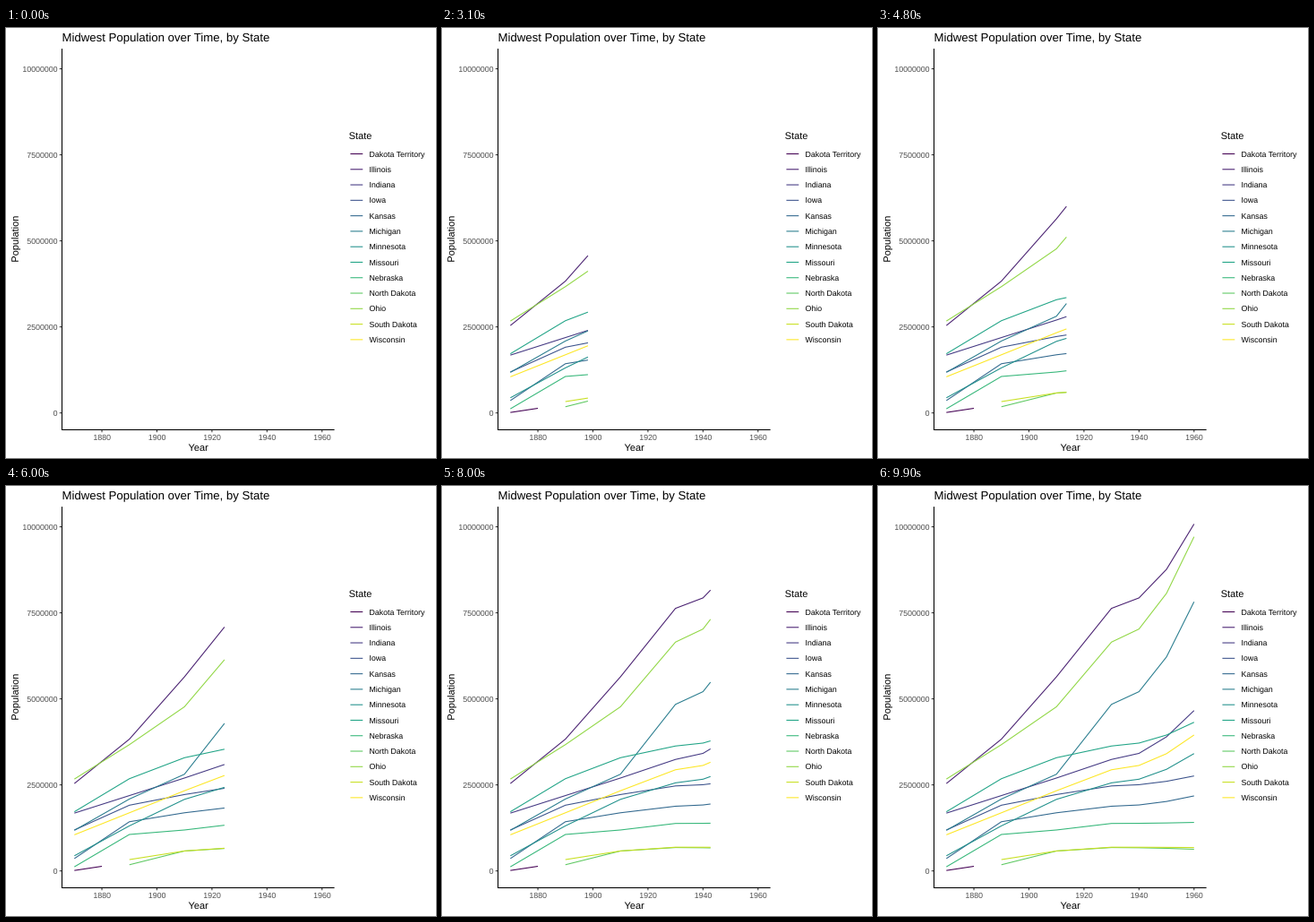
Recreate the animation shown at these times as a matplotlib script. Size 480 by 480 pixels, loop 10 s.

```python
import numpy as np
import matplotlib.pyplot as plt
from matplotlib.animation import FuncAnimation
from matplotlib.patches import PathPatch
from matplotlib.textpath import TextPath
from matplotlib.transforms import Affine2D

SIZE, DPI = 480, 72          # one point equals one pixel
FRAMES, INTERVAL = 100, 100
LINE = 1.07
FIRST, LAST = 1870, 1960

# Millions of people in the key years, from each state's first year on
KEY_YEARS = np.array([1870, 1890, 1910, 1930, 1960])
STATES = {
    "Dakota Territory": (0.014, 0.256),
    "Illinois": (2.54, 3.83, 5.64, 7.63, 10.08),
    "Indiana": (1.68, 2.19, 2.70, 3.24, 4.66),
    "Iowa": (1.19, 1.91, 2.22, 2.47, 2.76),
    "Kansas": (0.36, 1.43, 1.69, 1.88, 2.18),
    "Michigan": (1.18, 2.09, 2.81, 4.84, 7.82),
    "Minnesota": (0.44, 1.31, 2.08, 2.56, 3.41),
    "Missouri": (1.72, 2.68, 3.29, 3.63, 4.32),
    "Nebraska": (0.12, 1.06, 1.19, 1.38, 1.41),
    "North Dakota": (0.18, 0.58, 0.68, 0.63),
    "Ohio": (2.67, 3.67, 4.77, 6.65, 9.71),
    "South Dakota": (0.33, 0.58, 0.69, 0.68),
    "Wisconsin": (1.05, 1.69, 2.33, 2.94, 3.95),
}
SPANS = {"Dakota Territory": (1870, 1880),
         "North Dakota": (1890, LAST), "South Dakota": (1890, LAST)}

# Panel edges in pixels, y pointing down
LEFT, RIGHT, TOP, BOTTOM = 62.5, 366.6, 23.1, 448.5
LOW, HIGH = 0.014, 10.081
LEGEND, KEY = 382.7, 17.28


def scale(value, lo, hi, start, end):
    """Map value to pixels with 5% padding on both sides."""
    pad = 0.05 * (hi - lo)
    return start + (value - lo + pad) / (hi - lo + 2 * pad) * (end - start)


def px(year):
    return scale(year, FIRST, LAST, LEFT, RIGHT)


def py(pop):
    return scale(pop, LOW, HIGH, BOTTOM, TOP)


def census(name):
    """Decades and counts; growth after 1930 starts slowly and speeds up."""
    first, last = SPANS.get(name, (FIRST, LAST))
    years = np.arange(first, last + 1, 10)
    keys = STATES[name]
    knots = KEY_YEARS[KEY_YEARS >= first][:len(keys)]
    late = np.clip((years - 1930) / 30, 0, 1)
    eased = np.minimum(years, 1930) + 30 * late ** 1.9
    return years, np.interp(eased, knots, keys)


plt.rcParams["font.family"] = "Liberation Sans"
fig = plt.figure(figsize=(SIZE / DPI, SIZE / DPI), dpi=DPI, facecolor="white")
ax = fig.add_axes([0, 0, 1, 1])
ax.set_xlim(0, SIZE)
ax.set_ylim(SIZE, 0)
ax.axis("off")


def stroke(xs, ys, color):
    return ax.plot(xs, ys, color=color, lw=LINE, snap=False,
                   solid_capstyle="butt", solid_joinstyle="round")[0]


def label(x, y, text, size, color="black", align=0, angle=0):
    """Text on a baseline; align is 0 left, 0.5 centre, 1 right."""
    path = TextPath((0, 0), text, size=size)
    shift = align * path.get_extents().x1
    place = (Affine2D().translate(-shift, 0).scale(1, -1)
             .rotate_deg(-angle).translate(x, round(y)))
    ax.add_patch(PathPatch(path.transformed(place), fc=color, lw=0,
                           snap=False))


# Curves
colors = plt.get_cmap("viridis")(np.linspace(0, 1, len(STATES)))
curves = [(stroke([], [], color), *census(name))
          for name, color in zip(STATES, colors)]

# Axes
for year in range(1880, 1961, 20):
    stroke([px(year)] * 2, [BOTTOM, BOTTOM + 2.75], "#333333")
    label(px(year), 460, str(year), 8.8, "#4d4d4d", align=0.5)
for pop in np.arange(0, 10.1, 2.5):
    stroke([LEFT - 2.75, LEFT], [py(pop)] * 2, "#333333")
    label(57.2, py(pop) + 3.15, f"{pop * 1e6:.0f}", 8.8, "#4d4d4d", align=1)
stroke([LEFT, LEFT], [TOP, BOTTOM + 0.5], "black")
stroke([LEFT - 0.5, RIGHT], [BOTTOM, BOTTOM], "black")

# Titles
label(LEFT, 15, "Midwest Population over Time, by State", 13.2)
label((LEFT + RIGHT) / 2, 472, "Year", 11, align=0.5)
label(13.8, (TOP + BOTTOM) / 2, "Population", 11, align=0.5, angle=90)

# Legend
label(LEGEND, 124, "State", 11)
for i, (name, color) in enumerate(zip(STATES, colors)):
    y = 140.5 + KEY * i
    stroke([LEGEND + 0.1 * KEY, LEGEND + 0.9 * KEY], [y, y], color)
    label(LEGEND + KEY + 5.5, y + 3.15, name, 8.8)


def update(frame):
    now = FIRST + (LAST - FIRST) * frame / (FRAMES - 1)
    for line, years, pops in curves:
        seen = years <= now
        xs, ys = years[seen], pops[seen]
        if years[0] <= now < years[-1]:
            xs = np.append(xs, now)
            ys = np.append(ys, np.interp(now, years, pops))
        line.set_data(px(xs), py(ys))
    return [line for line, _, _ in curves]


anim = FuncAnimation(fig, update, frames=FRAMES, interval=INTERVAL,
                     init_func=lambda: update(0), repeat=True, repeat_delay=0)
plt.show()
```
